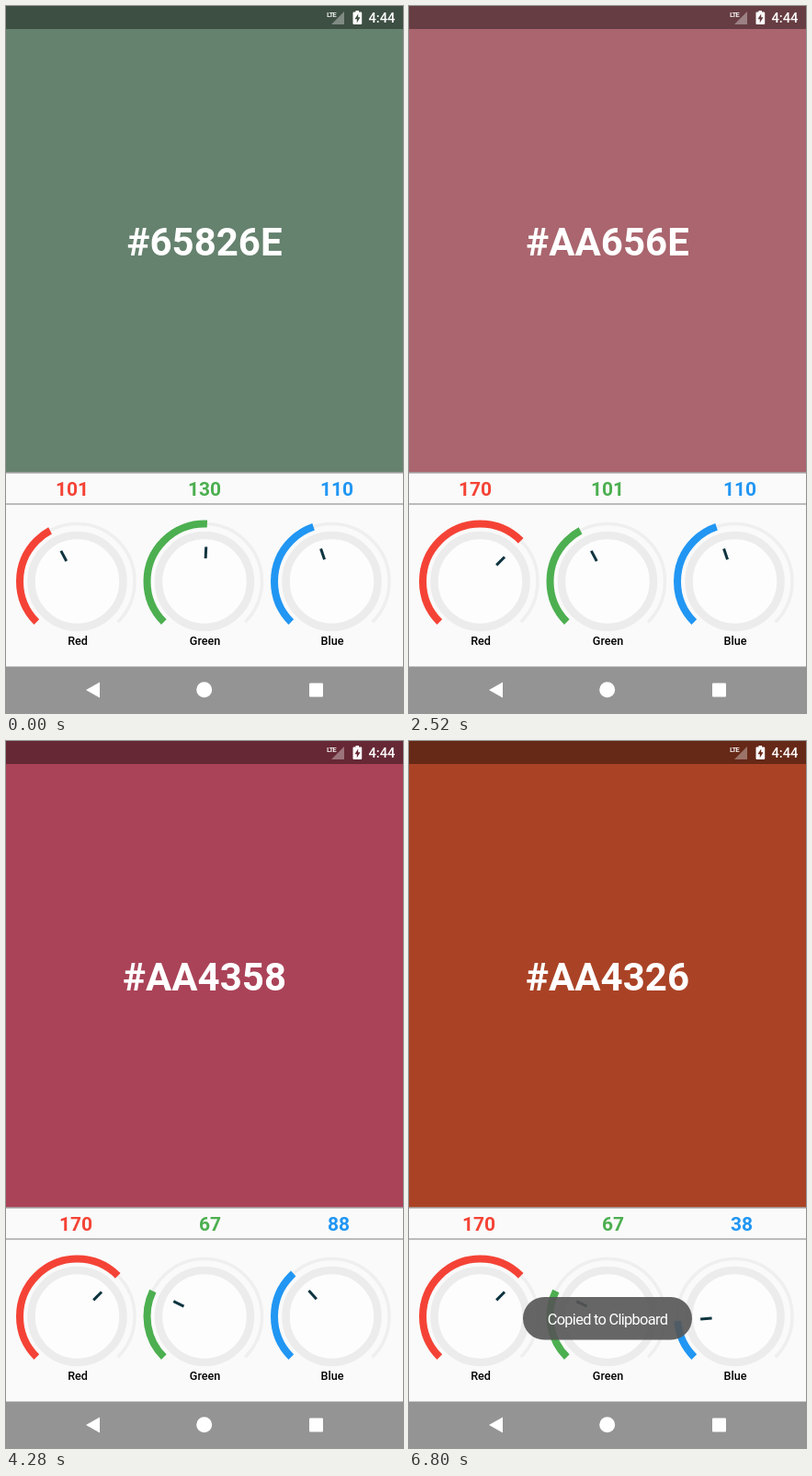
Animation, 432 px wide and 768 px high, one loop 7 s. Source, as an HTML page:

```html
<!DOCTYPE html>
<html lang="en">
<head>
<meta charset="utf-8">
<title>Colour knobs</title>
<style>
  html, body { margin: 0; width: 100%; height: 100%; overflow: hidden; background: #fafafa; }
  #stage { position: relative; width: 432px; height: 768px; overflow: hidden; font-family: Roboto, sans-serif; }
  svg { position: absolute; inset: 0; }
  text { font-family: Roboto, sans-serif; }
  #values {
    position: absolute; left: 0; top: 507px; width: 432px; height: 36px;
    display: flex; justify-content: space-around; align-items: center;
    font-size: 21px; font-weight: 700;
  }
</style>
</head>
<body>
<div id="stage">
  <svg width="432" height="768" viewBox="0 0 432 768">
    <rect width="432" height="768" fill="#fafafa"/>
    <rect id="swatch" width="432" height="507"/>
    <rect width="432" height="25" fill="#000" fill-opacity=".4"/>
    <g fill="#fff">
      <path d="M354 20L368 6V20Z" fill-opacity=".35"/>
      <text x="349" y="12" font-size="8" font-weight="500" letter-spacing="-1.1">LTE</text>
      <path d="M380.5 6.5V5h3.5v1.500h2.200q1 0 1 1V19q0 1-1 1h-7.700q-1 0-1-1V7.500q0-1 1-1Z"/>
      <path id="bolt" d="M383.200 8.500L379.500 14.200H381.800V18.200L385.500 12.300H383.200Z"/>
      <text x="394.500" y="18.300" font-size="14.700" font-weight="500">4:44</text>
      <text id="hex" x="216" y="270.500" font-size="42" font-weight="700" text-anchor="middle"></text>
    </g>
    <path d="M0 507H432M0 541H432" stroke="#a6a6a6" stroke-width="1.500"/>
    <g id="knobs"></g>
    <rect y="717.500" width="432" height="50.500" fill="#949494"/>
    <g fill="#fff">
      <path d="M87 743L102 734.500V751.500Z"/>
      <circle cx="215.700" cy="742.700" r="8.500"/>
      <rect x="330" y="735.500" width="15" height="15" rx="1"/>
    </g>
    <g id="toast">
      <rect x="124" y="604" width="184" height="46.500" rx="23.200" fill="#565656" fill-opacity=".9"/>
      <text x="216" y="634" font-size="16.400" letter-spacing="-.7" text-anchor="middle" fill="#fff">Copied to Clipboard</text>
    </g>
  </svg>
  <div id="values"></div>
</div>
<script>
const LOOP = 7000;
const $ = id => document.getElementById(id);

// Each track is a list of [start ms, value]; values hold until the next step.
const channels = [
  { name: 'Red', color: '#f44336', x: 77.5,
    steps: [[0, 101], [200, 105], [400, 122], [560, 139], [760, 153], [960, 164], [1160, 170]] },
  { name: 'Green', color: '#4caf50', x: 216,
    steps: [[0, 130], [2120, 127], [2320, 118], [2520, 101], [2720, 84], [2920, 74], [3120, 69], [3320, 67]] },
  { name: 'Blue', color: '#2196f3', x: 354.5,
    steps: [[0, 110], [3880, 107], [4080, 100], [4280, 88], [4480, 70], [4640, 53], [4840, 38]] }
];
const toastSteps = [[0, 0], [6200, .25], [6400, .6], [6600, .85], [6800, 1]];

const at = (steps, t) => steps.reduce((v, [start, next]) => t >= start ? next : v, 0);
const hex2 = v => v.toString(16).toUpperCase().padStart(2, '0');

const R = 62.5, D = R * Math.SQRT1_2;
const arc = `M${-D} ${D}A${R} ${R} 0 1 1 ${D} ${D}`;

for (const c of channels) {
  const g = document.createElementNS('http://www.w3.org/2000/svg', 'g');
  g.setAttribute('transform', `translate(${c.x} 625)`);
  g.innerHTML = `
    <path d="${arc}" fill="none" stroke="#efefef" stroke-width="3.5"/>
    <path class="level" d="${arc}" pathLength="255" fill="none" stroke="${c.color}" stroke-width="8"/>
    <circle r="50" fill="#fdfdfd" stroke="#ececec" stroke-width="8.5"/>
    <path class="mark" d="M0 -25V-37.5" stroke="#0f3440" stroke-width="3"/>
    <text x=".5" y="69" font-size="12.6" font-weight="500" text-anchor="middle">${c.name}</text>`;
  $('knobs').append(g);
  c.level = g.querySelector('.level');
  c.mark = g.querySelector('.mark');
  c.label = document.createElement('span');
  c.label.style.color = c.color;
  $('values').append(c.label);
}

function draw(t) {
  const rgb = channels.map(c => at(c.steps, t));
  channels.forEach((c, i) => {
    c.level.setAttribute('stroke-dasharray', `${rgb[i]} 300`);
    c.mark.setAttribute('transform', `rotate(${rgb[i] / 255 * 270 - 135})`);
    c.label.textContent = rgb[i];
  });
  $('swatch').setAttribute('fill', `rgb(${rgb})`);
  $('bolt').setAttribute('fill', `rgb(${rgb.map(v => Math.round(v * .6))})`);
  $('hex').textContent = '#' + rgb.map(hex2).join('');
  $('toast').setAttribute('opacity', at(toastSteps, t));
}

const begin = performance.now();
function frame() {
  draw((performance.now() - begin) % LOOP);
  requestAnimationFrame(frame);
}
frame();
</script>
</body>
</html>
```
